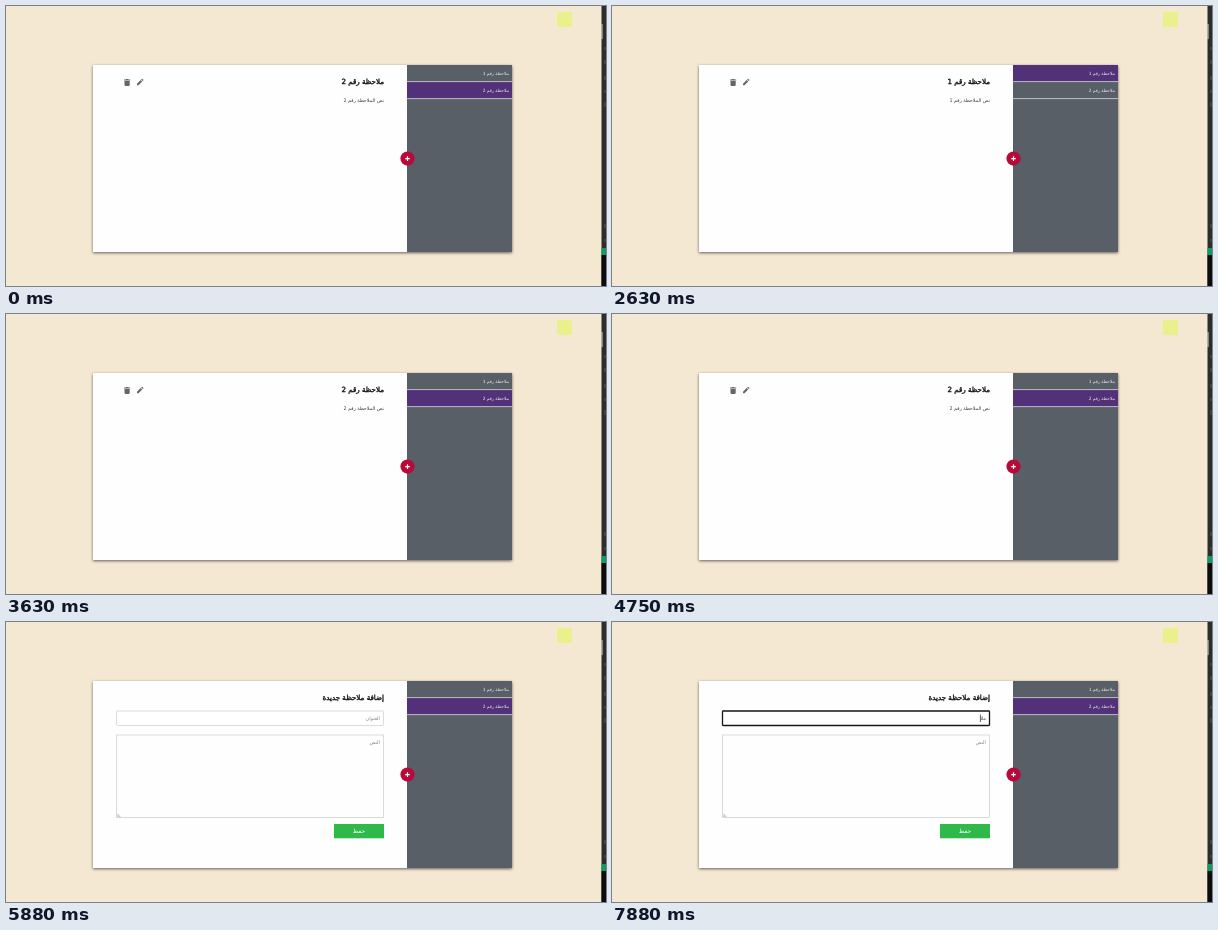
Write an HTML page that moves like this. It is 600 px wide and 280 px high and loops after 8 s.

```html
<!DOCTYPE html>
<html lang="ar">
<head>
<meta charset="utf-8">
<title>Notes</title>
<style>
  html, body { margin: 0; width: 100%; height: 100%; overflow: hidden; background: #f5e8d3; }
  svg { display: block; width: 100vw; height: 100vh; }
  text { direction: rtl; font-family: "DejaVu Sans", sans-serif; font-size: 5px; }
  .title { font-size: 7.1px; fill: #111; stroke: #111; stroke-width: .35px; }
  .body { font-size: 4.8px; fill: #3c3c3c; }
  .row { font-size: 4.4px; fill: #e9e9ec; }
  .hint { fill: #858585; }
  .typed { fill: #444; }
  .save { font-size: 6px; fill: #fff; text-anchor: middle; }
  .icon { fill: #666; }
  .shadow { filter: drop-shadow(.5px 1px 1.6px rgba(0, 0, 0, .6)); }
</style>
</head>
<body>
<svg viewBox="0 0 600 280">
  <rect width="600" height="280" fill="#f5e8d3"/>

  <g id="edge">
    <rect x="595.5" width="4.5" height="280" fill="#2c2e2b"/>
    <rect x="595.5" y="18" width="1" height="15" fill="#d9d5cc"/>
    <path d="M599 41v3M599 54v4M599 70v4M599 84v3M599 96v5M599 218v4M599 233v3" stroke="#555852"/>
    <rect x="595.5" y="242" width="4.5" height="7" fill="#119b62"/>
    <rect x="595.5" y="249" width="4.5" height="31" fill="#0b0c0b"/>
  </g>

  <rect id="logo" x="551" y="6" width="15" height="15" fill="#eaf08c"/>

  <rect class="shadow" x="87" y="59" width="419" height="187" fill="#595f66"/>
  <rect x="87" y="59" width="314" height="187" fill="#fefefe"/>

  <g id="list">
    <rect id="active" x="401" width="105" height="16.5" fill="#523179"/>
    <path d="M401 75.6h105M401 92.6h105" stroke="#c9c6d0" stroke-width=".9"/>
    <text class="row" x="503" y="69.4">ملاحظة رقم 1</text>
    <text class="row" x="503" y="86.2">ملاحظة رقم 2</text>
  </g>

  <g id="note">
    <g class="icon">
      <path d="M118 73.6h1.6l.5-.7h2l.5.7h1.6v.9h-6.2zM118.5 75.1h5.2v4q0 .8-.8.8h-3.6q-.8 0-.8-.8z"/>
      <path d="M131 79.2v-1.5l3.7-3.7 1.5 1.5-3.7 3.7zM135.1 73.6l.7-.7q.3-.3.6 0l.9.9q.3.3 0 .6l-.7.7z"/>
    </g>
    <text class="title" id="noteTitle" x="378" y="78.2"></text>
    <text class="body" id="noteBody" x="378" y="95.6"></text>
  </g>

  <g id="form">
    <text class="title" x="378" y="78.2">إضافة ملاحظة جديدة</text>
    <rect id="field" x="110.5" y="89" width="267" height="14.5" rx=".8" fill="#fff"/>
    <text class="hint" id="hint" x="374" y="98.2">العنوان</text>
    <text class="typed" id="typed" x="374" y="98.2"></text>
    <rect id="caret" y="92.5" width=".7" height="7.5" fill="#222"/>
    <rect x="110.5" y="113" width="267" height="82.5" fill="#fefefe" stroke="#d2d2d2" stroke-width=".8"/>
    <path d="M111.3 192l3 3M111.3 193.8l1.2 1.2" stroke="#777" stroke-width=".6"/>
    <text class="hint" x="374" y="122.4">النص</text>
    <rect x="328" y="202" width="50" height="14.3" fill="#2eb94a"/>
    <text class="save" x="353" y="211.4">حفظ</text>
  </g>

  <circle cx="401.5" cy="152.6" r="7.1" fill="#b80a38"/>
  <path d="M399.2 152.6h4.6M401.5 150.3v4.6" stroke="#fff" stroke-width="1.2"/>
</svg>

<script>
const LOOP = 8000;
const FORM_AT = 5880, FOCUS_AT = 6630;
const selections = [[0, 2], [2630, 1], [3630, 2]];
const typing = [[0, ""], [7500, "م"], [7750, "مل"], [7880, "ملا"]];
const caretOff = [7250, 7500];

const el = id => document.getElementById(id);
const show = (id, on) => el(id).setAttribute("visibility", on ? "visible" : "hidden");
const at = (steps, t) => steps.filter(([start]) => t >= start).pop()[1];

function setText(id, value) {
  if (el(id).textContent !== value) el(id).textContent = value;
}

function render(t) {
  const n = at(selections, t);
  const adding = t >= FORM_AT;
  const focused = t >= FOCUS_AT;
  const word = at(typing, t);

  el("active").setAttribute("y", n === 1 ? 59 : 76);
  setText("noteTitle", `ملاحظة رقم ${n}`);
  setText("noteBody", `نص الملاحظة رقم ${n}`);
  show("note", !adding);
  el("form").setAttribute("display", adding ? "inline" : "none");

  el("field").setAttribute("stroke", focused ? "#161616" : "#d2d2d2");
  el("field").setAttribute("stroke-width", focused ? 1.3 : .8);
  show("hint", !word);
  setText("typed", word);
  const width = word ? el("typed").getComputedTextLength() : 0;
  el("caret").setAttribute("x", 373.6 - width);
  show("caret", focused && !(t >= caretOff[0] && t < caretOff[1]));
}

const start = performance.now();
function tick() {
  render((performance.now() - start) % LOOP);
  requestAnimationFrame(tick);
}
tick();
</script>
</body>
</html>
```
